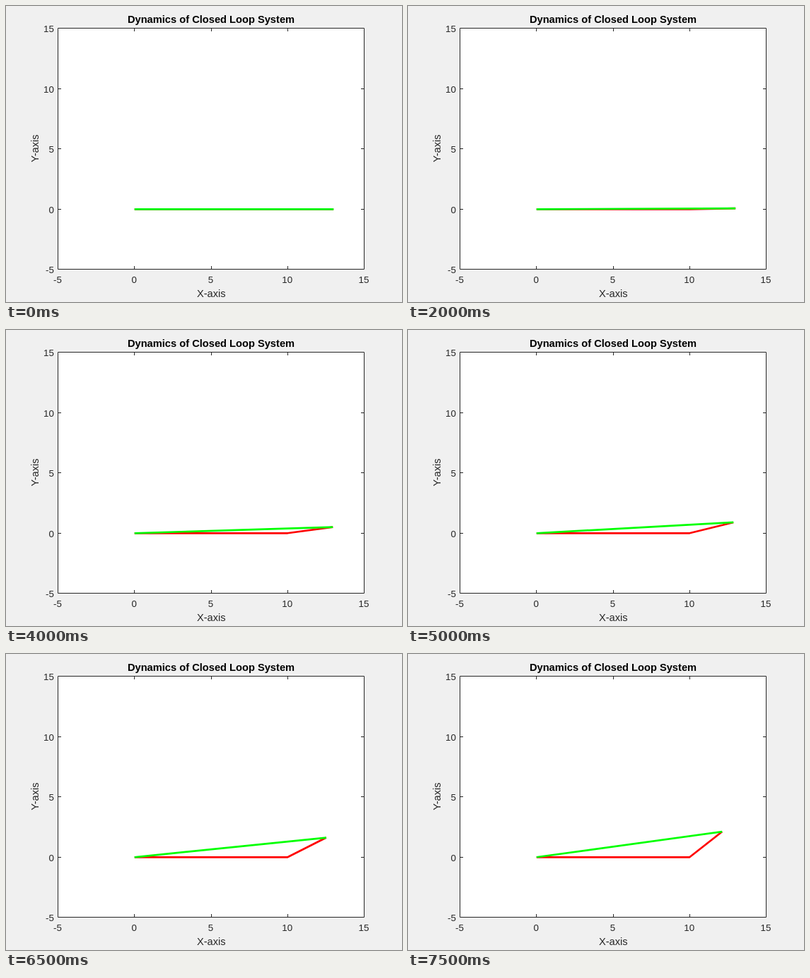
Animation, 560 px wide and 420 px high, one loop 8000 ms. Source, as an HTML page:

```html
<!DOCTYPE html>
<html lang="en">
<head>
<meta charset="utf-8">
<title>Dynamics of Closed Loop System</title>
<style>
  html, body { margin: 0; width: 100%; height: 100%; overflow: hidden; background: #f0f0f0; }
  svg { display: block; width: 560px; height: 420px; }
  text { font: 14.667px "Liberation Sans", Arial, sans-serif; fill: #262626; text-anchor: middle; }
  .title { font-weight: bold; fill: #000; }
  .tick { font-size: 13.333px; }
  .y { text-anchor: end; }
  path { fill: none; stroke-width: 2.67; stroke-linejoin: round; }
  #axes { stroke: #262626; stroke-width: 1; }
</style>
</head>
<body>
<svg viewBox="0 0 560 420">
  <rect x="73" y="31" width="434" height="343" fill="#fff"/>
  <path id="axes"/>
  <text class="title" x="290" y="24">Dynamics of Closed Loop System</text>
  <text x="290.3" y="413">X-axis</text>
  <text transform="translate(45.5 202) rotate(-90)">Y-axis</text>
  <g id="labels"></g>
  <path id="links" stroke="#f00"/>
  <path id="closing" stroke="#0f0"/>
</svg>
<script>
const $ = id => document.getElementById(id);
const px = x => 181.75 + x * 21.65;
const py = y => 288.3 - y * 17.1;
const crisp = v => Math.floor(v) + 0.5;

function label(text, x, y, cls) {
  const el = document.createElementNS("http://www.w3.org/2000/svg", "text");
  el.textContent = text;
  el.setAttribute("x", x);
  el.setAttribute("y", y);
  el.setAttribute("class", cls);
  $("labels").append(el);
}

let axes = "M73.5 31.5H506.5V373.5H73.5Z";
for (let v = -5; v <= 15; v += 5) {
  label(v, px(v) - 0.5, 393, "tick");
  label(v, 67.8, Math.round(py(v) + 5.6), "tick y");
  if (v > -5 && v < 15) {
    const x = crisp(px(v)), y = crisp(py(v));
    axes += `M${x} 373v-4M${x} 32v4M74 ${y}h4M506 ${y}h-4`;
  }
}
$("axes").setAttribute("d", axes);

// Joint angle after k half-second steps
const angle = k => k * k * (0.001867 + 0.000312 * k - 0.0000114 * k * k);

function draw(now) {
  const k = Math.max(0, Math.floor(now % 8000 / 500) - 1);
  const a = angle(k);
  const base = `${px(0)} ${py(0)}`;
  const tip = `${px(10 + 3 * Math.cos(a))} ${py(3 * Math.sin(a))}`;
  $("links").setAttribute("d", `M${base}L${px(10)} ${py(0)}L${tip}`);
  $("closing").setAttribute("d", `M${base}L${tip}`);
  requestAnimationFrame(draw);
}
draw(performance.now());
</script>
</body>
</html>
```
